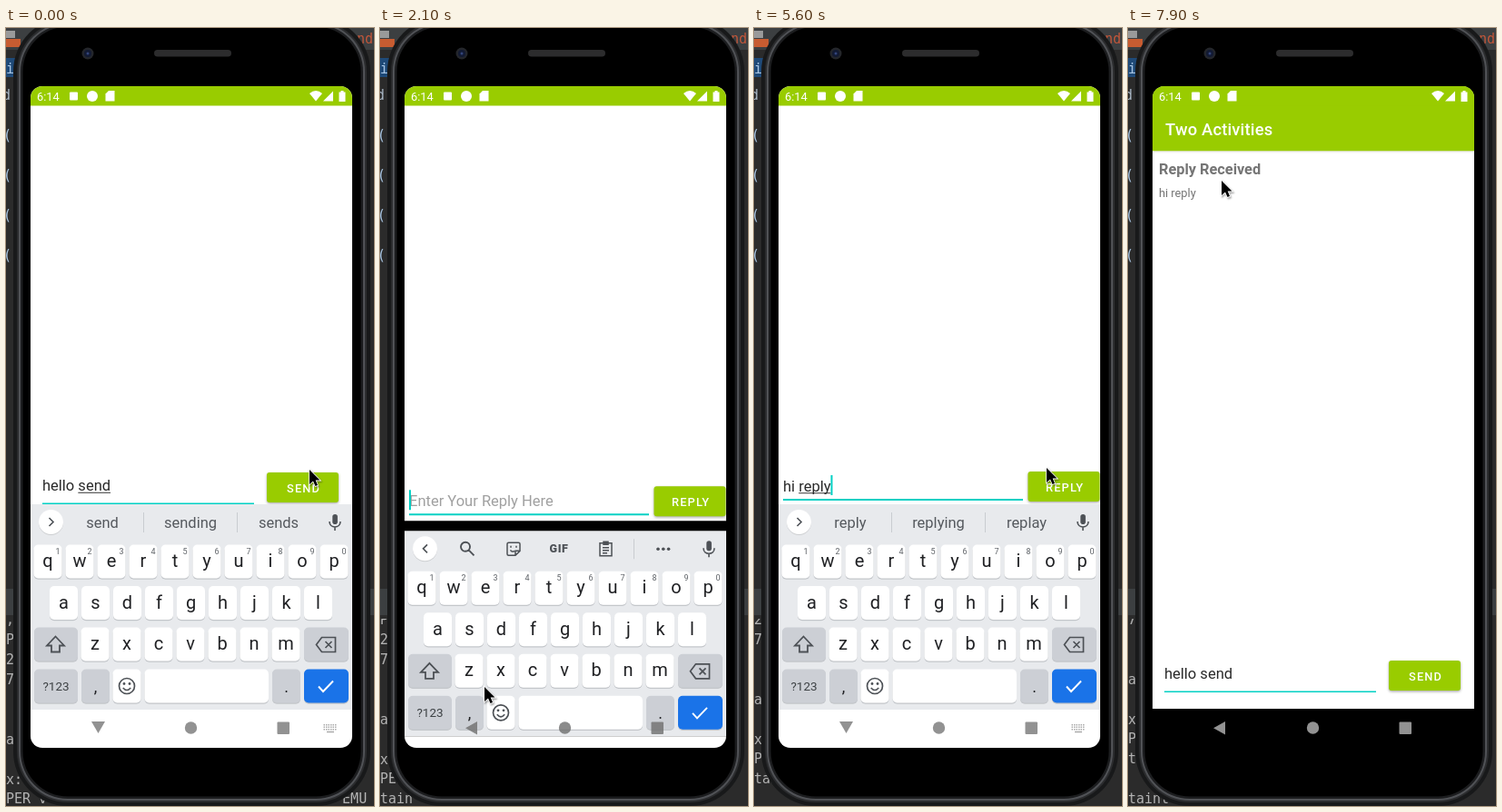
An HTML page with a canvas for the animation above (8000 ms loop, 405 px wide and 856 px high).

```html
<!DOCTYPE html>
<html lang="en">
<head>
<meta charset="utf-8">
<title>Two activities demo</title>
<style>
html, body { margin: 0; width: 405px; height: 856px; overflow: hidden; background: #2b2b2b; }
canvas { display: block; width: 405px; height: 856px; }
</style>
</head>
<body>
<canvas id="stage"></canvas>
<script>
const W = 405, H = 856, LOOP = 8000;
const GREEN = '#99cc00', TEAL = '#03d0c4', INK = '#202124', ICON = '#4d5156';
const dpr = window.devicePixelRatio || 1;

function prepare(canvas) {
  canvas.width = W * dpr;
  canvas.height = H * dpr;
  const g = canvas.getContext('2d');
  g.scale(dpr, dpr);
  return g;
}
const layer = document.createElement('canvas');
const main = prepare(document.getElementById('stage'));
const layerCtx = prepare(layer);
let c = main;

// ---------- helpers ----------
const clamp = v => Math.max(0, Math.min(1, v));
const easeOut = p => 1 - (1 - clamp(p)) ** 3;

function rect(x, y, w, h, color, r = 0) {
  c.fillStyle = color;
  c.beginPath();
  c.roundRect(x, y, w, h, r);
  c.fill();
}
function disc(x, y, r, color) {
  c.fillStyle = color;
  c.beginPath();
  c.arc(x, y, r, 0, 7);
  c.fill();
}
function shape(d, x, y, fill, stroke, width = 1.6) {
  const path = new Path2D(d);
  c.save();
  c.translate(x, y);
  if (fill) { c.fillStyle = fill; c.fill(path); }
  if (stroke) { c.strokeStyle = stroke; c.lineWidth = width; c.stroke(path); }
  c.restore();
}
function text(s, x, y, size, color, { weight = 400, align = 'left', gap = 0, font = 'Roboto, sans-serif' } = {}) {
  c.font = `${weight} ${size}px ${font}`;
  c.letterSpacing = gap + 'px';
  c.textAlign = align;
  c.fillStyle = color;
  c.fillText(s, x, y);
}
function layered(draw) {
  c.save();
  draw();
  c.restore();
}
function shadow(alpha, blur, dx, dy) {
  c.shadowColor = `rgba(0,0,0,${alpha})`;
  c.shadowBlur = blur * dpr;
  c.shadowOffsetX = dx * dpr;
  c.shadowOffsetY = dy * dpr;
}
function zoom(s, x, y) {
  c.translate(x, y);
  c.scale(s, s);
  c.translate(-x, -y);
}
const within = (t, spans) => spans.some(([a, b]) => t >= a && t < b);

// ---------- timeline data ----------
const POINTER = [[0, 334, 486], [100, 334, 486], [300, 327, 495], [900, 327, 495], [1600, 115, 725],
  [4900, 115, 725], [5000, 150, 640], [5100, 200, 530], [5200, 200, 530], [5300, 285, 455],
  [5400, 345, 433], [5500, 372, 455], [5600, 322, 484], [5800, 323, 502], [6800, 323, 502],
  [7700, 103, 171], [7800, 103, 171], [7900, 103, 168]];
const TYPED = [
  [0, '', null],
  [3400, 'hi ', ['there', 'I', "I'm"]],
  [3700, 'hi r', ['r', 'right', 'rest']],
  [4000, 'hi re', ['re', 'really', 'reply']],
  [4100, 'hi rep', ['rep', 'reply', 'replay']],
  [4300, 'hi repl', ['reply', 'replay', 'replied']],
  [4400, 'hi reply', ['reply', 'replay', 'replied']],
  [4600, 'hi reply', ['reply', 'replying', 'replay']]];
const CARET_OFF = [[0, 100], [3500, 3700], [5000, 5300], [6900, 7400], [7900, 8000]];
const LOG = [[651, ','], [673, 'P'], [695, '2'], [717, '7'], [783, 'a'], [827, 'x:'],
  [848, 'PER v'], [870, 'tain'], [914, 'taint']];

// ---------- desktop and phone body ----------
function desktop(t) {
  rect(0, 0, W, H, '#2b2b2b');
  rect(0, 0, W, 24, '#3c3f41');
  rect(0, 3, 10, 8, '#9a9a9a');
  rect(0, 12, 16, 9, '#c75c31');
  rect(0, 33, 12, 21, '#1f4a78');
  const mono = { font: '"DejaVu Sans Mono", monospace' };
  text('i', 0, 50, 15, '#a9c7e6', mono);
  text('d', -4, 79, 15, '#a9b7c6', mono);
  for (let i = 0; i < 4; i++) text('(', -3, 123 + i * 44, 15, '#a9c7e6', mono);
  text('nd', 386, 17, 15, '#c4573a', mono);
  rect(0, 617, W, 29, '#3c3f41');
  const shift = 22 * [800, 2300, 6900].filter(s => t >= s).length;
  c.save();
  c.beginPath();
  c.rect(0, 650, W, 206);
  c.clip();
  for (const [y, s] of LOG) text(s, 0, y + 5 - shift, 15, '#b4b4b4', mono);
  if (!shift) text('0: EMU', 343, 853, 15, '#b4b4b4', mono);
  c.restore();
}

function phone() {
  const rings = [[0, '#18191a'], [4, '#2b2c2e'], [6, '#505256'], [8, '#1c1d1f'], [10.5, '#000']];
  for (const [d, color] of rings) rect(8 + d, -12 + d, 393 - 2 * d, 868 - 2 * d, color, 60 - d);
  disc(90, 28, 6.5, '#24262b');
  disc(90, 28, 4, '#121a33');
  disc(90, 28, 1.5, '#33457a');
  rect(163, 24, 85, 7.5, '#2c2c2d', 4);
}

// ---------- app screens ----------
const statusBar = () => rect(27, 64, 354, 21.5, GREEN);

function statusIcons() {
  text('6:14', 34, 79.5, 12.8, '#fff');
  rect(70, 70.5, 9, 9, '#fff', 1);
  disc(95, 75, 6, '#fff');
  shape('M3.5 0H10V11.5H0V3.5Z', 109.5, 69, '#fff');
  shape('M0 3Q7 -3 14 3L7 11.5Z', 334, 69, '#fff');
  shape('M11 0V11H0Z', 349, 69.5, '#fff');
  shape('M2 0H5V1.5H7V12H0V1.5H2Z', 366.5, 69, '#fff');
}

function appBar(title, x, bottom) {
  layered(() => {
    shadow(0.2, 3, 0, 1);
    rect(27, 64, 354, bottom - 64, GREEN);
  });
  text(title, x, 118, 18.3, '#fff', { weight: 500, gap: 0.2 });
}

function button(label, x, y, ripple) {
  layered(() => {
    shadow(0.35, 3, 0, 1.2);
    rect(x, y, 79, 33, GREEN, 3);
  });
  if (ripple > 0) {
    c.save();
    c.beginPath();
    c.roundRect(x, y, 79, 33, 3);
    c.clip();
    disc(x + 40, y + 14, 60 * ripple, 'rgba(255,255,255,.12)');
    c.restore();
  }
  text(label, x + 40.6, y + 21.5, 12.8, '#fff', { weight: 500, align: 'center', gap: 1.14 });
}

function field(s, x, y, composing, caret) {
  text(s, x, y, 16.5, '#2a2a2a');
  const end = x + c.measureText(s).width;
  if (composing) {
    const start = x + c.measureText(s.slice(0, s.lastIndexOf(' ') + 1)).width;
    rect(start, y + 1.7, end - start, 1, '#333');
  }
  if (caret) rect(end, y - 17.5, 2, 22, TEAL);
}

function sender(t, pan, caret) {
  c.translate(0, -pan);
  rect(27, 64, 354, 685, '#fff');
  appBar('Two Activities', 41, 135.3);
  if (t > 6000) {
    text('Reply Received', 34, 160.5, 16.33, '#757575', { weight: 700 });
    text('hi reply', 34, 186, 12.8, '#757575');
  }
  rect(40, 729.5, 233, 1.5, TEAL);
  field('hello send', 40, 716, t < 800, caret);
  button('SEND', 287, 696, t < 800 ? clamp((t - 100) / 200) : 0);
}

function receiver(t, pan, caret) {
  c.translate(0, -pan);
  rect(27, 64, 354, 684, '#fff');
  appBar('Second Activity', 92, 136);
  shape('M14 7H1M7 0.8L0.8 7L7 13.2', 45, 104, null, '#fff', 1.7);
  text('Message Received', 27, 153.5, 16.33, '#757575', { weight: 700 });
  text('hello send', 56, 179, 12.8, '#757575');
  const focused = t >= 1800;
  if (focused) rect(32, 740, 264, 2, TEAL);
  else rect(32, 740, 264, 1, '#868686');
  const typed = typedAt(t)[1];
  if (!typed) text('Enter Your Reply Here', 32, 731.5, 16.5, '#a0a0a0');
  field(typed, 32, 731.5, t >= 3700, focused && caret);
  button('REPLY', 301.5, 710, clamp((t - 5600) / 200));
}

const typedAt = t => TYPED.findLast(row => t >= row[0]);

// ---------- keyboard ----------
function key(x, y, w, color = '#fff') {
  rect(x, y + 1.2, w, 37, '#c3c6ca', 5);
  rect(x, y, w, 37, color, 5);
}

function keyRow(letters, x, y, digits) {
  [...letters].forEach((ch, i) => {
    const mid = x + i * 35;
    key(mid - 15.5, y, 31);
    text(ch, mid, y + 24.5, 20, INK, { align: 'center' });
    if (digits) text((i + 1) % 10, mid + 11, y + 10, 9, '#5f6368', { align: 'center' });
  });
}

function strip(words) {
  disc(49.5, 544.5, 13.5, 'rgba(0,0,0,.12)');
  disc(49.5, 543.5, 13.5, '#fff');
  shape(words ? 'M0 0L4.5 4.5L0 9' : 'M4.5 0L0 4.5L4.5 9', 47.5, 539, null, ICON);
  if (words) {
    words.forEach((w, i) => text(w, 106 + i * 97, 550, 16.5, '#55595e', { align: 'center' }));
    rect(151, 533, 1, 22, '#c9ccd0');
    rect(254, 533, 1, 22, '#c9ccd0');
  } else {
    shape('M10 5A5 5 0 1 1 0 5A5 5 0 1 1 10 5M8.6 8.6L14.5 14.5', 89, 536.5, null, ICON, 1.9);
    shape('M1.5 0H12.5Q14 0 14 1.5V9L9 14H1.5Q0 14 0 12.5V1.5Q0 0 1.5 0M14 9H9V14M4 3.5V5.5M10 3.5V5.5M3.5 8Q5.5 11 8 9', 140, 537, null, ICON, 1.5);
    text('GIF', 197, 548, 12.5, ICON, { weight: 900, align: 'center', gap: 0.6 });
    shape('M0 2H13V16H0ZM4 0.5H9V3.5H4ZM3 7H10M3 10H10M3 13H8', 242, 535.5, null, ICON, 1.5);
    rect(279, 533, 1, 22, '#c9ccd0');
    for (let i = 0; i < 3; i++) disc(306 + i * 5.8, 544, 1.8, ICON);
  }
  rect(359.3, 535, 5.6, 11, ICON, 2.8);
  shape('M0 0C0 8 12 8 12 0M6 6V10', 356, 543, null, ICON, 1.6);
}

function keyboard(t, drop) {
  c.translate(0, drop);
  rect(27, 524, 354, 226, '#e8eaed');
  rect(27, 750, 354, 60, '#fff');
  strip(t < 800 ? ['send', 'sending', 'sends'] : typedAt(t)[2]);
  keyRow('qwertyuiop', 46, 568.5, true);
  keyRow('asdfghjkl', 63.5, 614, false);
  keyRow('zxcvbnm', 98, 659.5, false);
  const grey = '#cccfd5';
  key(31, 659.5, 48, grey);
  shape('M9.5 0L19 10H14V17H5V10H0Z', 45, 669.5, null, ICON, 1.8);
  key(328, 659.5, 49, grey);
  shape('M6 0H21V16H6L0 8ZM10 4.5L17 11.5M17 4.5L10 11.5', 341.5, 670.5, null, ICON, 1.7);
  key(31, 705.5, 48, grey);
  text('?123', 55, 729, 13.5, '#3c4043', { align: 'center' });
  key(83, 705.5, 31, grey);
  text(',', 98.5, 731, 18, INK, { align: 'center' });
  key(117.5, 705.5, 31);
  shape('M17 8.5A8.5 8.5 0 1 1 0 8.5A8.5 8.5 0 1 1 17 8.5M4.3 10.5Q8.5 15.5 12.7 10.5', 124.5, 715.5, null, ICON, 1.7);
  disc(130, 721.5, 1.4, ICON);
  disc(136, 721.5, 1.4, ICON);
  key(152.5, 705.5, 136.5);
  key(293, 705.5, 31, grey);
  text('.', 308.5, 731, 18, INK, { align: 'center' });
  key(328, 705.5, 49, '#1a73e8');
  shape('M0 6L5 11.5L16 0', 344, 718.5, null, '#fff', 1.9);
}

function navIcons(color, open) {
  if (open) shape('M0 0H15L7.5 13Z', 94, 763, color);
  else shape('M13 0V14.5L0 7.2Z', 94, 763, color);
  disc(203.5, 770, 6.7, color);
  rect(298.5, 763.5, 13.5, 13.5, color, 1);
}
function navKeyboard() {
  for (let y = 0; y < 3; y++)
    for (let x = 0; x < 6; x++) rect(349.5 + x * 2.5, 766 + y * 2.5, 1.5, 1.5, '#aaa');
  rect(353, 773.8, 8, 1.4, '#aaa');
}

// ---------- scene ----------
function switchBack(t, caret) {
  const p = clamp((t - 6300) / 250);
  layered(() => { zoom(1.1 - 0.105 * p, 204, 340); sender(t, 207, caret); });
  c = layerCtx;
  c.clearRect(0, 0, W, H);
  layered(() => {
    zoom(1 - 0.0925 * p, 204, 428);
    c.beginPath();
    c.rect(27, 64, 354, 728);
    c.clip();
    rect(27, 64, 354, 728, '#000');
    layered(() => receiver(t, 222, caret));
    statusBar();
  });
  c = main;
  c.globalAlpha = clamp(1 - 1.67 * p);
  c.drawImage(layer, 0, 0, W, H);
  c.globalAlpha = 1;
  statusIcons();
  navIcons('#505050', true);
}

function screen(t) {
  const caret = !within(t, CARET_OFF);
  rect(27, 64, 354, 728, '#000');
  if (t >= 6300 && t < 6600) return switchBack(t, caret);

  const onSecond = t >= 800 && t < 6300;
  const rise = easeOut((t - 1850) / 430);
  if (onSecond) layered(() => receiver(t, 222 * rise, caret));
  else layered(() => sender(t, t < 800 ? 207 : 0, caret));
  statusBar();
  statusIcons();

  let drop = t < 800 ? 0 : 268;
  if (onSecond) drop = 268 * (1 - easeOut((t - 1860) / 460));
  if (t >= 6100) drop = 268 * clamp((t - 6000) / 250);
  if (drop < 268) layered(() => keyboard(t, drop));
  const open = t < 800 || (t >= 2200 && t < 6600);
  navIcons(t >= 1900 && t < 2200 ? 'rgba(110,110,110,.8)' : '#929292', open);
  if (drop < 15) navKeyboard();
}

function pointer(t) {
  const i = POINTER.findLastIndex(k => t >= k[0]);
  const [t0, x0, y0] = POINTER[i];
  const [t1, x1, y1] = POINTER[i + 1] || [LOOP, x0, y0];
  const p = (t - t0) / (t1 - t0);
  const x = x0 + (x1 - x0) * p, y = y0 + (y1 - y0) * p;
  const arrow = 'M0 0V16L4 12.5L6.5 18L9 17L6.7 11.6H11.5Z';
  layered(() => {
    shadow(0.4, 2, 1, 1.5);
    shape(arrow, x, y, null, '#fff', 1.6);
  });
  shape(arrow, x, y, '#000');
}

function frame(now) {
  const t = Math.floor((now % LOOP) / 100) * 100;
  desktop(t);
  phone();
  c.save();
  c.beginPath();
  c.roundRect(27, 64, 354, 728, 13);
  c.clip();
  screen(t);
  c.restore();
  pointer(t);
  requestAnimationFrame(frame);
}
requestAnimationFrame(frame);
</script>
</body>
</html>
```
